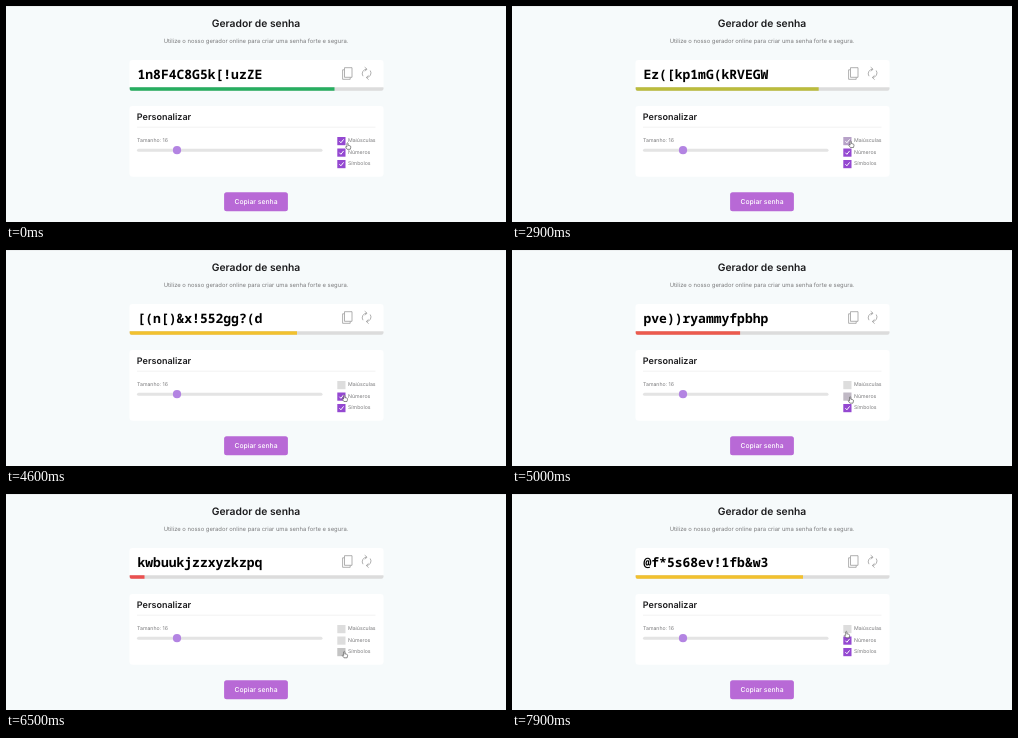
Write an HTML page that moves like this. It is 500 by 216 pixels and loops after 8 s.

```html
<!DOCTYPE html>
<html lang="pt-BR">
<head>
<meta charset="utf-8">
<title>Gerador de senha</title>
<style>
  html, body { margin: 0; width: 100%; height: 100%; overflow: hidden; background: #f6fafb; }
  svg { display: block; width: 500px; height: 216px; }
  text { font-family: Inter, sans-serif; fill: #7b7b7d; text-rendering: geometricPrecision; }
  .head { font-weight: 600; fill: #1c1c1e; }
  .label { font-size: 5.2px; }
  #password { font: 600 13px "Noto Sans Mono", monospace; fill: #000; white-space: pre; }
  .icon { fill: none; stroke: #9c9c9c; stroke-width: .8; }
</style>
</head>
<body>
<svg viewBox="0 0 500 216">
  <rect width="500" height="216" fill="#f6fafb"/>
  <path d="M0 .5H500" stroke="#eceff0"/>
  <text class="head" x="250" y="21" font-size="10.3" text-anchor="middle">Gerador de senha</text>
  <text x="250" y="37.3" font-size="5.86" text-anchor="middle">Utilize o nosso gerador online para criar uma senha forte e segura.</text>

  <path d="M123.5 82V57a3 3 0 0 1 3-3H374.5a3 3 0 0 1 3 3V82Z" fill="#fff"/>
  <text id="password" x="131.5" y="73.2"></text>
  <g class="icon">
    <path d="M338.5 61.7H346V71.3H338.5ZM338.3 63.8H336.6V73.3H344.2V71.5"/>
    <path d="M357 70.2A4.5 4.5 0 0 1 360.8 63.2M358.7 61.2L361 63.2L358.9 65.3M364.2 64.5A4.5 4.5 0 0 1 360.4 71.5M362.5 69.4L360.3 71.5L362.6 73.6"/>
  </g>
  <clipPath id="track"><path d="M123.5 81.3H377.5V82.7a2 2 0 0 1-2 2H125.5a2 2 0 0 1-2-2Z"/></clipPath>
  <g clip-path="url(#track)">
    <rect x="123" y="81" width="255" height="4" fill="#dcdcdc"/>
    <rect id="bar" x="123.5" y="81" height="4"/>
  </g>

  <rect x="123.5" y="100" width="254" height="70.7" rx="3" fill="#fff"/>
  <text class="head" x="130.8" y="114.3" font-size="9.03">Personalizar</text>
  <path d="M131 121.2H369.5" stroke="#eee" stroke-width=".7"/>
  <text class="label" x="131" y="136.3">Tamanho: 16</text>
  <rect x="131" y="142.7" width="185.5" height="3" rx="1.5" fill="#e4e4e4"/>
  <circle cx="171" cy="144.2" r="4.1" fill="#b384e2"/>
  <g id="options"></g>

  <rect x="218.1" y="186.2" width="63.8" height="19" rx="2.5" fill="#b869d6"/>
  <text x="250" y="198.2" font-size="6.8" font-weight="500" text-anchor="middle" style="fill:#fff">Copiar senha</text>

  <path id="cursor" fill="#fff" stroke="#444" stroke-width=".6" stroke-linejoin="round"
    d="M-.6 .5Q0-.5 .6 .5V2.5L2.5 3Q3.4 3.2 3.3 4.3L2.8 6.5H-.3L-2 4.2Q-2 3.300-.6 4.1Z"/>
</svg>
<script>
const LOOP = 8000, STEP = 100, FADE = 275;
const GREEN = [39, 174, 96], YELLOW = [242, 193, 46], RED = [235, 80, 80];
const PURPLE = [148, 72, 209], OFF = [221, 221, 221], OFF_HOVER = [196, 196, 196];

// start time, password, checked options, bar width, bar colour
const states = [
  [-1000, "1n8F4C8G5k[!uzZE", [1, 1, 1], 205, GREEN],
  [925, "*]&?][me23zz3h4j", [0, 1, 1], 167.5, YELLOW],
  [2825, "Ez([kp1mG(kRVEGW", [1, 1, 1], 205, GREEN],
  [4300, "[(n[)&x!552gg?(d", [0, 1, 1], 167.5, YELLOW],
  [4750, "pve))ryammyfpbhp", [0, 0, 1], 103.5, RED],
  [5950, "kwbuukjzzxyzkzpq", [0, 0, 0], 15, RED],
  [6925, "t(kq&hw!zm)ruf?b", [0, 0, 1], 103.5, RED],
  [7625, "@f*5s68ev!1fb&w3", [0, 1, 1], 167.5, YELLOW]
];

// time, x, y of the fingertip
const path = [
  [0, 341.5, 136.8], [200, 341.5, 136.8], [300, 341, 139], [400, 339.5, 138], [500, 338.7, 135],
  [3400, 338.7, 135], [3800, 338, 137], [4300, 338.2, 138], [4600, 338.2, 145],
  [4900, 338.2, 145], [5600, 338, 156.5], [6300, 338.3, 157.3],
  [7000, 338.3, 157.3], [7500, 337, 148], [7700, 336.5, 147.5], [7900, 334.3, 137.3]
];

const $ = id => document.getElementById(id);
const mix = (a, b, p) => a + (b - a) * p;
const blend = (a, b, p) => a.map((v, i) => mix(v, b[i], p));
const rgb = c => `rgb(${c.map(Math.round)})`;
const ease = p => 1 - (1 - p) ** 1.7;

const options = ["Maiúsculas", "Números", "Símbolos"].map((name, i) => {
  const y = 131 + i * 11.5;
  const g = document.createElementNS("http://www.w3.org/2000/svg", "g");
  g.innerHTML = `<rect x="331.3" y="${y}" width="8.2" height="8.2"/>
    <path d="M333.4 ${y + 4.2}l1.5 1.6 2.7-3.4" fill="none" stroke="#fff" stroke-width="1"/>
    <text class="label" x="342" y="${y + 5.3}">${name}</text>`;
  $("options").append(g);
  return { y, box: g.children[0], tick: g.children[1] };
});

function cursorAt(t) {
  const i = path.findIndex(k => k[0] > t);
  if (i < 0) return path.at(-1).slice(1);
  const [a, b] = [path[i - 1], path[i]];
  return blend(a, b, (t - a[0]) / (b[0] - a[0])).slice(1);
}

function draw(t) {
  const n = states.findLastIndex(s => s[0] <= t);
  const [start, password, checked, width, colour] = states[n];
  const [, , oldChecked, oldWidth, oldColour] = states[Math.max(0, n - 1)];
  const p = Math.min(1, (t - start) / FADE);
  const [x, y] = cursorAt(t);

  $("password").textContent = password;
  $("bar").setAttribute("width", mix(oldWidth, width, ease(p)));
  $("bar").setAttribute("fill", rgb(blend(oldColour, colour, p)));
  $("cursor").setAttribute("transform", `translate(${x} ${y})`);
  options.forEach((o, i) => {
    const on = mix(oldChecked[i], checked[i], p);
    const hover = x > 335 && x < 339.5 && y > o.y && y < o.y + 8.2;
    o.box.setAttribute("fill", rgb(blend(hover ? OFF_HOVER : OFF, PURPLE, on)));
    o.tick.setAttribute("opacity", checked[i]);
  });
}

const begin = performance.now();
function frame() {
  const t = (performance.now() - begin) % LOOP;
  draw(Math.floor(t / STEP) * STEP);
  requestAnimationFrame(frame);
}
frame();
</script>
</body>
</html>
```
